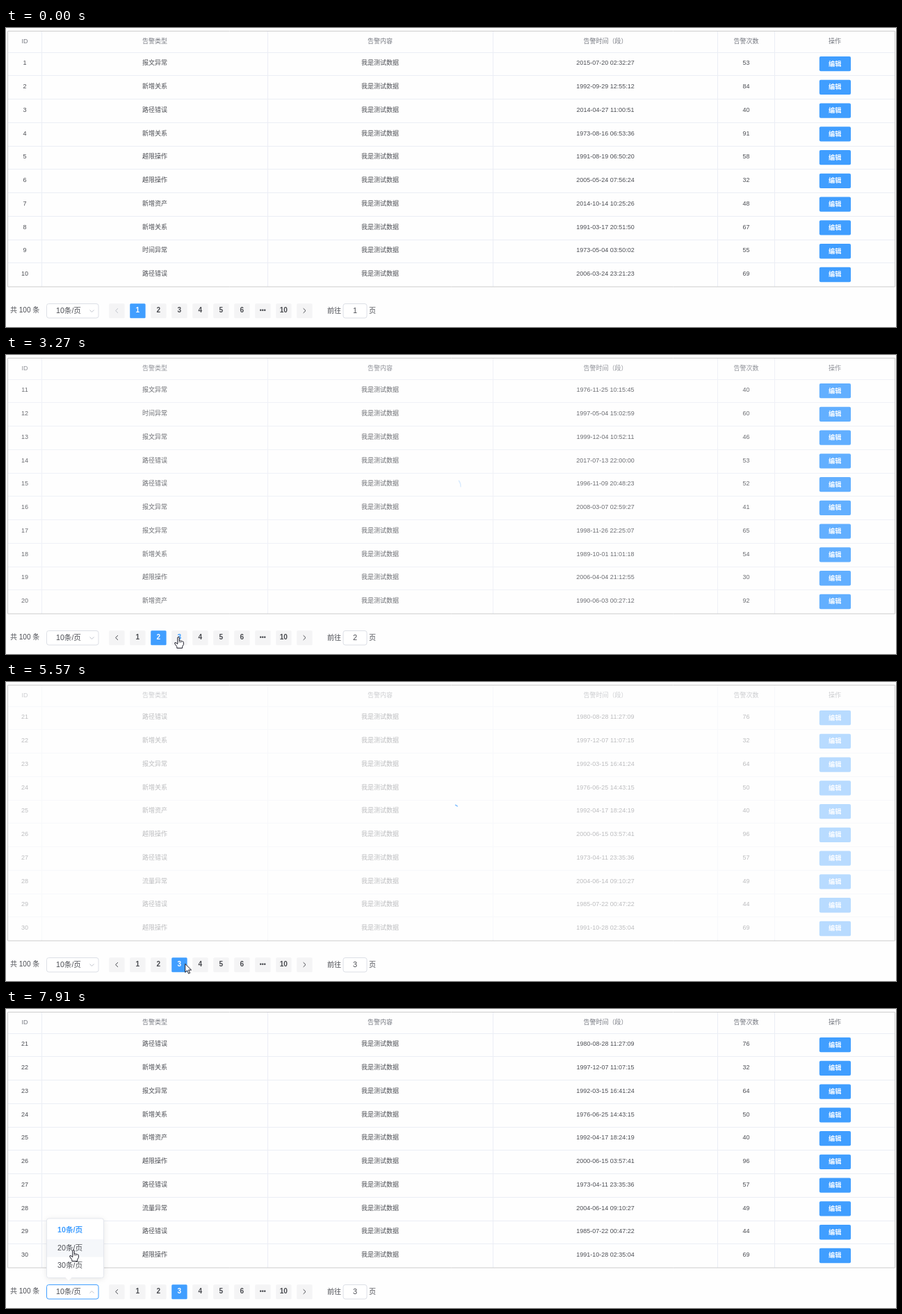
Write an HTML page with a canvas that moves like this. It is 1280 px wide and 431 px high and loops after 8 s.

```html
<!DOCTYPE html>
<html lang="zh">
<head>
<meta charset="utf-8">
<style>
html, body { margin: 0; width: 100%; height: 100%; overflow: hidden; background: #fefefe; }
canvas { display: block; }
</style>
</head>
<body>
<canvas width="1280" height="431"></canvas>
<script>
const ctx = document.querySelector('canvas').getContext('2d');
const FONT = '"Liberation Sans", "Noto Sans CJK SC", "Noto Sans CJK", sans-serif';
const BLUE = '#409eff', TEXT = '#4c4e54', PALE = '#c0c4cc', BORDER = '#dcdfe6';
const LOOP = 8000, CLICKS = [1620, 4010], LOAD = 1500, FADE = 300, OPEN = 6930;

const pages = [
`报文异常,2015-07-20 02:32:27,53
新增关系,1992-09-29 12:55:12,84
路径错误,2014-04-27 11:00:51,40
新增关系,1973-08-16 06:53:36,91
越限操作,1991-08-19 06:50:20,58
越限操作,2005-05-24 07:56:24,32
新增资产,2014-10-14 10:25:26,48
新增关系,1991-03-17 20:51:50,67
时间异常,1973-05-04 03:50:02,55
路径错误,2006-03-24 23:21:23,69`,
`报文异常,1976-11-25 10:15:45,40
时间异常,1997-05-04 15:02:59,60
报文异常,1999-12-04 10:52:11,46
路径错误,2017-07-13 22:00:00,53
路径错误,1996-11-09 20:48:23,52
报文异常,2008-03-07 02:59:27,41
报文异常,1998-11-26 22:25:07,65
新增关系,1989-10-01 11:01:18,54
越限操作,2006-04-04 21:12:55,30
新增资产,1990-06-03 00:27:12,92`,
`路径错误,1980-08-28 11:27:09,76
新增关系,1997-12-07 11:07:15,32
报文异常,1992-03-15 16:41:24,64
新增关系,1976-06-25 14:43:15,50
新增资产,1992-04-17 18:24:19,40
越限操作,2000-06-15 03:57:41,96
路径错误,1973-04-11 23:35:36,57
流量异常,2004-06-14 09:10:27,49
路径错误,1985-07-22 00:47:22,44
越限操作,1991-10-28 02:35:04,69`
].map(page => page.split('\n').map(row => row.split(',')));

// Pointer path: time, x, y
const path = [
  [370, 310, 426], [1030, 220, 407], [2700, 220, 407], [3270, 248, 406],
  [4010, 248, 406], [4880, 257, 403], [5150, 257, 403], [5840, 258, 408],
  [6260, 501, 418], [6900, 115, 407], [7350, 115, 407], [7910, 97, 347], [LOOP, 97, 347]
];

const clamp = v => Math.max(0, Math.min(1, v));

function bezier(x1, y1, x2, y2, p) {
  const at = (a, b, s) => 3 * a * s * (1 - s) ** 2 + 3 * b * s * s * (1 - s) + s ** 3;
  let lo = 0, hi = 1;
  for (let i = 0; i < 16; i++) {
    const mid = (lo + hi) / 2;
    if (at(x1, x2, mid) < p) lo = mid; else hi = mid;
  }
  return at(y1, y2, lo);
}
const ease = p => bezier(.25, .1, .25, 1, clamp(p));
const easeInOut = p => bezier(.42, 0, .58, 1, clamp(p));

function text(str, x, y, { size = 9, color = TEXT, bold = false, align = 'center' } = {}) {
  ctx.font = `${bold ? 'bold ' : ''}${size}px ${FONT}`;
  ctx.fillStyle = color;
  ctx.textAlign = align;
  ctx.textBaseline = 'middle';
  ctx.fillText(str, x, y);
}

function box(x, y, w, h, r, fill, stroke) {
  ctx.beginPath();
  ctx.roundRect(x, y, w, h, r);
  if (fill) { ctx.fillStyle = fill; ctx.fill(); }
  if (stroke) { ctx.strokeStyle = stroke; ctx.lineWidth = 1; ctx.stroke(); }
}

function polyline(points, color, width = 1) {
  ctx.beginPath();
  points.forEach(p => ctx.lineTo(...p));
  ctx.strokeStyle = color;
  ctx.lineWidth = width;
  ctx.stroke();
}

const inside = (p, x, y, w, h) => p && p.x >= x && p.x <= x + w && p.y >= y && p.y <= y + h;

function pointerAt(t) {
  const i = path.findIndex(k => k[0] > t);
  if (i < 1) return null;
  const [a, b] = [path[i - 1], path[i]];
  const p = (t - a[0]) / (b[0] - a[0]), s = p * p * (3 - 2 * p);
  return { x: a[1] + (b[1] - a[1]) * s, y: a[2] + (b[2] - a[2]) * s, shape: 'arrow' };
}

function drawTable(page) {
  ctx.fillStyle = '#ebeef5';
  for (let i = 0; i < 10; i++) ctx.fillRect(3, Math.round(34.5 + i * 33.75), 1275, 1);
  for (const x of [51, 376, 700, 1023, 1105]) ctx.fillRect(x, 5, 1, 368);
  const centers = [27, 214, 538, 862, 1064.5, 1192];
  ['ID', '告警类型', '告警内容', '告警时间（段）', '告警次数', '操作']
    .forEach((s, i) => text(s, centers[i], 19.5, { color: '#777a82' }));
  pages[page].forEach(([type, time, count], i) => {
    const y = 51 + i * 33.72;
    [page * 10 + i + 1, type, '我是测试数据', time, count]
      .forEach((s, c) => text(s, centers[c], y));
    const top = 41 + i * 33.76;
    box(1169.8, top, 45.2, 21.3, 2, BLUE);
    text('编辑', 1192.3, top + 11, { size: 9.2, color: '#fff', bold: true });
  });
}

function drawLoading(t, click) {
  const since = t - click;
  const alpha = ease(since / FADE) * (1 - ease((since - LOAD) / FADE));
  if (alpha <= 0) return;
  ctx.save();
  ctx.globalAlpha = alpha;
  ctx.fillStyle = 'rgba(255,255,255,.9)';
  ctx.fillRect(3, 5, 1275, 367);

  // Dash grows in the first half of the cycle, then slides off the end
  const spin = since + 50, p = spin % 1500 / 750;
  const grow = easeInOut(p), slide = easeInOut(p - 1);
  const start = 40 * grow + 80 * slide, end = Math.min(start + 1 + 89 * grow, 40 * Math.PI);
  const turn = spin / 2000 * 2 * Math.PI;
  ctx.beginPath();
  ctx.arc(641, 189, 12.9, turn + start / 20, turn + end / 20);
  ctx.strokeStyle = BLUE;
  ctx.lineWidth = 1.4;
  ctx.lineCap = 'round';
  ctx.stroke();
  ctx.restore();
}

function drawPager(page, pointer, open) {
  text('共 100 条', 6, 407.5, { size: 10, align: 'left' });

  const onSelect = inside(pointer, 58, 397, 75, 21);
  box(58.5, 397.5, 74.5, 20.5, 3, '#fff', open ? BLUE : onSelect ? PALE : BORDER);
  text('10条/页', 72, 408, { size: 10.6, align: 'left' });
  const d = open ? -1.5 : 1.5;
  polyline([[120.5, 408 - d], [123.5, 408 + d], [126.5, 408 - d]], PALE);
  if (onSelect) pointer.shape = 'hand';

  ['prev', '1', '2', '3', '4', '5', '6', '•••', '10', 'next'].forEach((label, i) => {
    const x = 148.2 + i * 30, cx = x + 11.1;
    const active = i === page + 1, disabled = i === 0 && page === 0;
    const hover = inside(pointer, x, 397, 22.5, 21);
    if (hover && !active && !disabled) pointer.shape = 'hand';
    const color = active ? '#fff' : disabled ? PALE : hover ? BLUE : '#484a4f';
    box(x, 397.2, 22.4, 21, 1.5, active ? BLUE : '#f4f4f5');
    if (i % 9 === 0) {
      const s = i ? 1.7 : -1.7;
      polyline([[cx - s, 404.2], [cx + s, 407.5], [cx - s, 410.8]], color);
    } else {
      text(label, cx, 407.5, { size: i === 7 ? 8.5 : 10, color, bold: true });
    }
  });

  text('前往', 462, 408, { size: 10, align: 'left' });
  box(485, 397.5, 34, 20.5, 3, '#fff', BORDER);
  text(page + 1, 502, 408, { size: 10.8 });
  text('页', 522, 408, { size: 10, align: 'left' });
  if (inside(pointer, 485, 397, 34, 21.5)) pointer.shape = 'beam';
}

function drawMenu(t, pointer) {
  const p = clamp((t - OPEN) / FADE);
  if (p <= 0) return;
  const s = bezier(.23, 1, .32, 1, p);
  ctx.save();
  ctx.globalAlpha = s;
  ctx.translate(0, 388);
  ctx.scale(1, s);
  ctx.translate(0, -388);
  ctx.shadowColor = 'rgba(0,0,0,.1)';
  ctx.shadowBlur = 9;
  ctx.shadowOffsetY = 1.5;
  box(58.5, 302, 82, 85.5, 3, '#fff');
  ctx.shadowColor = 'transparent';
  box(58.5, 302, 82, 85.5, 3, null, '#e4e7ed');
  ctx.beginPath();
  [[85.5, 387], [90, 391.5], [94.5, 387]].forEach(q => ctx.lineTo(...q));
  ctx.fillStyle = '#fff';
  ctx.fill();

  const row = Math.floor((pointer.y - 306.5) / 25.5);
  const onItem = row >= 0 && row < 3;
  if (onItem) pointer.shape = 'hand';
  ctx.fillStyle = '#f5f7fa';
  ctx.fillRect(59, 306.5 + (onItem ? row : 0) * 25.5, 81, 25.5);
  [10, 20, 30].forEach((n, i) => text(n + '条/页', 74, 319.5 + i * 25.5,
    { size: 10.7, align: 'left', bold: i === 0, color: i ? TEXT : BLUE }));
  ctx.restore();
}

const shapes = {
  arrow: 'M0 0V12.2L2.9 9.5L4.9 14L6.9 13.1L4.9 8.8H8.9Z',
  hand: 'M-1.2 1Q0-.6 1.2 1V6Q2.6 5 3.6 6.4Q5 5.6 5.7 7Q7.3 6.6 7.3 8.3V11.5L5.6 14.2V16.5H-2.2V14.5L-5.3 10Q-5.6 8.2-4 8.5L-1.2 10.6Z'
};
for (const name in shapes) shapes[name] = new Path2D(shapes[name]);

function drawPointer({ x, y, shape }) {
  if (shape === 'beam') {
    polyline([[x, y - 8], [x, y + 8]], '#222');
    for (const e of [-8, 8]) polyline([[x - 3, y + e], [x + 3, y + e]], '#222');
    return;
  }
  ctx.save();
  ctx.translate(x, y);
  ctx.fillStyle = '#fff';
  ctx.strokeStyle = '#1c1c28';
  ctx.lineWidth = 1;
  ctx.lineJoin = 'round';
  ctx.fill(shapes[shape]);
  ctx.stroke(shapes[shape]);
  if (shape === 'hand') {
    polyline([[1.3, 6], [1.3, 8.5]], '#1c1c28', .8);
    polyline([[3.6, 6.5], [3.6, 8.8]], '#1c1c28', .8);
  }
  ctx.restore();
}

function draw(t) {
  const page = CLICKS.filter(c => t >= c).length;
  const dataPage = CLICKS.filter(c => t >= c + 120).length;
  const pointer = pointerAt(t);
  ctx.fillStyle = '#fefefe';
  ctx.fillRect(0, 0, 1280, 431);
  drawTable(dataPage);
  CLICKS.forEach(c => drawLoading(t, c));
  box(2.5, 4.5, 1276, 368.5, 0, null, '#ccc');
  drawPager(page, pointer, t >= OPEN);
  drawMenu(t, pointer);
  if (pointer) drawPointer(pointer);
}

const began = performance.now();
function tick() {
  draw((performance.now() - began) % LOOP);
  requestAnimationFrame(tick);
}
tick();
</script>
</body>
</html>
```
